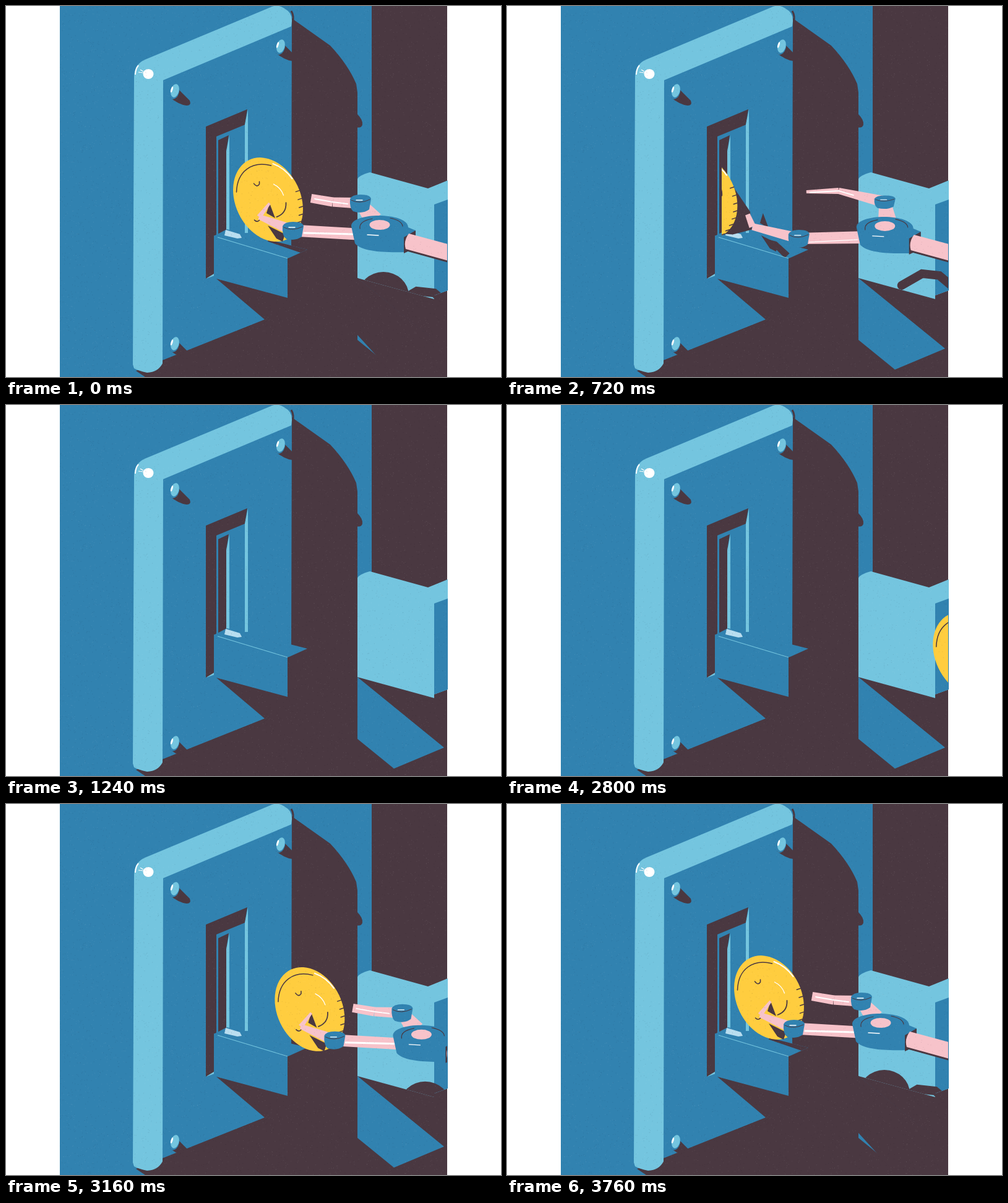
Recreate the animation shown at these times as an HTML page with a canvas. Size 800 by 600 pixels, loop 3.8 s.

```html
<!DOCTYPE html>
<html>
<head>
<meta charset="utf-8">
<title>Coin slot</title>
<style>
html, body { margin: 0; width: 100%; height: 100%; overflow: hidden; background: #fff; }
canvas { display: block; }
</style>
</head>
<body>
<canvas id="stage" width="800" height="600"></canvas>
<script>
const LOOP = 3800;
const BLUE = '#3182b0', LIGHT = '#74c5df', DARK = '#4a3841', GOLD = '#ffcd3f', PINK = '#f7c3ca', WHITE = '#fff';
const stage = document.getElementById('stage').getContext('2d');
let c = stage;

const fill = (color, d) => { c.fillStyle = color; c.fill(new Path2D(d)); };
const line = (color, width, d) => {
  c.strokeStyle = color;
  c.lineWidth = width;
  c.stroke(new Path2D(d));
};
const oval = (color, x, y, rx, ry, turn = 0) => {
  c.fillStyle = color;
  c.beginPath();
  c.ellipse(x, y, rx, ry, turn, 0, 7);
  c.fill();
};
const group = (x, y, draw) => { c.save(); c.translate(x, y); draw(); c.restore(); };
const clipped = (d, draw) => { c.save(); c.clip(new Path2D(d)); draw(); c.restore(); };
const lerp = (a, b, k) => a + (b - a) * k;
const smooth = k => { k = Math.min(1, Math.max(0, k)); return k * k * (3 - 2 * k); };
// Between two poses of [x, y, width] points
const blend = (a, b, k) => a.map((p, i) => p.map((v, j) => lerp(v, b[i][j], k)));

// Tapered limb between two [x, y, width] points
function bone(color, [x, y, w], [u, v, z]) {
  const d = 2 * Math.hypot(u - x, v - y), nx = (y - v) / d, ny = (u - x) / d;
  fill(color, `M${x + nx * w} ${y + ny * w}L${u + nx * z} ${v + ny * z}L${u - nx * z} ${v - ny * z}L${x - nx * w} ${y - ny * w}Z`);
}

// Smooth curve through [time, value] keys
function curve(keys, t) {
  const n = keys.length - 1;
  if (t <= keys[0][0]) return keys[0][1];
  if (t >= keys[n][0]) return keys[n][1];
  let i = 0;
  while (t >= keys[i + 1][0]) i++;
  const slope = j => {
    const p = keys[Math.max(0, j - 1)], q = keys[Math.min(n, j + 1)];
    return (q[1] - p[1]) / (q[0] - p[0]);
  };
  const [t0, v0] = keys[i], [t1, v1] = keys[i + 1];
  const h = t1 - t0, u = (t - t0) / h, w = 1 - u;
  return v0 * (1 + 2 * u) * w * w + v1 * u * u * (3 - 2 * u)
    + h * u * w * (slope(i) * w - slope(i + 1) * u);
}

const BLOCK = 'M568 280Q570 274 588 269L682 295L714 282V460L692 468V474L568 440Z';
const FLOOR = 'M566 438L714 558V600H566Z';
const TRAY_TOP = 'M338 371L357 361L487 394L456 408Z';
const COIN_ROOM = 'M347 0H800V600H455V408L347 373Z';
const SHADE_ROOM = 'M347 0H461V387L487 394L455 408L347 373Z';

function bolt() {
  fill(DARK, 'M8 -2L25 15Q28 23 20 23Q8 22 -7 10Z');
  oval(BLUE, 0, 0, 8, 13, .25);
  oval(LIGHT, 1, -1, 6.5, 11, .25);
  oval(WHITE, -4, -3, 1.5, 5, .3);
}

function scene() {
  c.fillStyle = BLUE;
  c.fillRect(87, 0, 626, 600);
  fill(DARK, 'M462 20L524 64Q553 95 566 126L568 140V285H591V0H713V600H225L210 590L418 507L340 441L461 400Z');
  fill(DARK, 'M567 174Q577 184 576 192Q574 198 567 196Z');
  line(DARK, 3, 'M461 8Q466 16 463 28');
  fill(LIGHT, 'M205 580L207 114Q208 94 224 87L430 1Q440 -3 450 4Q463 11 462 25L461 33L254 120L253 578Q246 592 228 593Q214 590 207 586Z');
  line(WHITE, 2, 'M209 111Q209 102 214 96');
  line(WHITE, 1.2, 'M214 107L222 108M217 103L222 106');
  oval(WHITE, 230, 110, 8.5, 8);
  for (const [x, y] of [[272, 138], [443, 66], [272, 547]]) group(x, y, bolt);

  fill(DARK, 'M323 195L390 167L386 192L340 211V370L336 372V434L323 441Z');
  fill(LIGHT, 'M391 167V367H386V192Z');
  fill(DARK, 'M343 217L360 209L356 235V365L343 370Z');
  fill(LIGHT, 'M361 209V364H356V235Z');
  fill(LIGHT, 'M323 441L336 433L340 435Z');
  fill(BLUE, TRAY_TOP);
  fill('#b9def0', 'M355 362L378 369L381 375L374 376L353 371Z');
  fill(BLUE, 'M336 371L455 408V472L336 440Z');
  line(LIGHT, 1.2, 'M342 374L455 408');

  fill(LIGHT, BLOCK);
  fill(BLUE, 'M692 321L714 313V460L692 468Z');
  fill(BLUE, 'M568 440L708 554L627 588L568 540Z');
}

function grain() {
  let seed = 7;
  const rnd = () => (seed = seed * 16807 % 2147483647) / 2147483647;
  for (let i = 0; i < 9000; i++) {
    c.fillStyle = i % 2 ? 'rgba(255,255,255,.09)' : 'rgba(30,20,40,.1)';
    c.fillRect(87 + rnd() * 625, rnd() * 600, 1, 1);
  }
}

function layer(draw) {
  const canvas = document.createElement('canvas');
  canvas.width = 800;
  canvas.height = 600;
  c = canvas.getContext('2d');
  draw();
  c = stage;
  return canvas;
}
const backdrop = layer(scene), specks = layer(grain);

function coin(turn) {
  const tilt = 1.126, cs = Math.cos(tilt), sn = Math.sin(tilt);
  oval(GOLD, 0, 0, 71, 52.6, tilt);
  line(DARK, 1.5, 'M-51 -12C-50 -46 -26 -63 5 -55');
  line(WHITE, 2, 'M8 -58Q27 -51 39 -34');
  // Ridges on the right rim
  for (let a = -1.45; a < 0; a += .19) {
    const u = 71 * Math.cos(a), v = 52.6 * Math.sin(a);
    line(DARK, 1.5, `M${u * cs - v * sn} ${u * sn + v * cs}l-6 2`);
  }
  c.rotate(turn);
  line(DARK, 1.6, 'M-23 -26Q-18 -19 -14 -25V-29M-22 33Q-17 38 -13 32');
  line(DARK, 1.8, 'M29 5Q30 22 14 28');
  line(WHITE, 1.3, 'M9 -25Q21 -19 25 -7');
}

function joint([x, y], h) {
  group(x, y, () => {
    c.scale(1, h);
    fill(BLUE, 'M-17 -7Q-14 -14 0 -14Q16 -14 17 -7L14 10Q3 18 -12 13Q-18 8 -17 -7Z');
    line(DARK, 1, 'M-15 -5Q-2 2 15 -6');
    line(WHITE, 1.3, 'M-7 -5L3 -5');
  });
}

// Finger points from tip to palm: gripping, then let go
const FAR = [
  [[493, 311, 14], [528, 317, 15], [573, 319, 18], [594, 346, 30]],
  [[477, 298.5, 5], [529, 297, 10], [604, 315, 19], [608, 346, 30]]];
const NEAR = [
  [[426, 319, 4], [409, 341, 8], [464, 363, 19], [568, 369, 19]],
  [[382, 335, 8], [390, 355, 11], [465, 374, 18], [574, 372, 20]]];
const TRAY_SHADE = [
  [[425, 374, 14], [495, 394, 22]],
  [[418, 375, 9], [446, 402, 11]]];

function finger([tip, bend, knuckle, palm], h) {
  bone(PINK, tip, bend);
  bone(PINK, bend, knuckle);
  bone(PINK, knuckle, palm);
  joint(knuckle, h);
}

function hand(k) {
  const far = blend(...FAR, k), near = blend(...NEAR, k);
  finger(far, lerp(1, .75, k));
  line(WHITE, 2, `M${far[0][0] + 6} ${far[0][1] + 1}L${far[1][0]} ${far[1][1]}l24 ${lerp(3, 7, k)}`);

  // Gap between the near finger and the coin
  const [x, y] = near[1];
  fill(DARK, `M${x + 17} ${y - 22}l9 24l-14 -8ZM${x + 14} ${y + 14}l28 14l-4 12l-10 -5Z`);
  finger(near, 1);
  line(WHITE, lerp(3, 1.3, k), `M482 ${lerp(367, 380, k)}L560 ${lerp(369, 376, k)}`);

  // Palm and arm
  fill(BLUE, 'M558 356C558 333 650 333 650 358L662 363V390L645 398C610 399 575 397 564 384Z');
  fill(DARK, 'M643 374L662 363V391L643 400Z');
  fill(DARK, 'M647 392L900 462V466L646 396Z');
  fill(PINK, 'M651 368Q642 380 646 393L900 463V435Z');
  line(DARK, 1.2, 'M572 360Q570 348 592 344M621 343Q640 347 641 356');
  line(WHITE, 1.4, 'M584 370L602 371M600 358Q608 360 615 355');
  oval(PINK, 604, 354, 16.5, 8);
}

// How far the hand is pulled back along its line of travel
function pull(t) {
  if (t < 640) return 0;
  if (t < 2000) return 1.65 * ((t - 640) / 40) ** 2;
  return curve([[2720, 394], [2800, 322], [3160, 68], [3320, 4], [3440, -6], [3760, 0]], t);
}

function shadows(k, slide) {
  clipped(FLOOR, () => group(-.63 * slide, .78 * slide, () =>
    fill(DARK, 'M548 422L740 578V720L597 564L568 532L520 480Z')));
}

function draw(t) {
  const release = t < 2000;
  const off = pull(t), dy = off * .28;
  const k = release ? smooth((t - 10) / 380) : 0;
  let x = 423.5 + off, y = 313 + dy, turn = 0;
  if (release) {
    // The coin drops onto the tray, then rolls faster and faster into the slot
    const n = t / 40;
    x -= .352 * n * n;
    y = 313 + 3.7 * n - .222 * n * n;
    turn = -.0035 * n * n;
  }

  c.clearRect(0, 0, 800, 600);
  c.drawImage(backdrop, 0, 0);
  c.save();
  c.beginPath();
  c.rect(87, 0, 626, 600);
  c.clip();

  const slide = release ? 130 * (t / 720) ** 5 : 0;
  clipped(FLOOR, () => group(-.63 * slide + (release ? 0 : off * 3), .78 * slide, () =>
    fill(DARK, 'M548 422L740 578V720L568 532L520 480Z')));
  clipped(BLOCK, () => group(off, dy, () => {
    oval(DARK, 610, lerp(468, 530, k), 41, 38);
    const drop = 30 * (1 - k);
    line(DARK, 14, `M631 ${450 + drop}L664 ${431 + drop}L692 ${434 + drop}L718 ${456 + drop}`);
  }));
  clipped(TRAY_TOP, () => group(off, dy, () => bone(DARK, ...blend(...TRAY_SHADE, k))));

  if (t < 860 || !release) {
    if (release) clipped(SHADE_ROOM, () => group(x, y, () => fill(DARK, 'M20 -50L43 -25L77 25L80 54L49 62L20 60Z')));
    clipped(COIN_ROOM, () => group(x, y, () => coin(turn)));
  }
  if (off < 400) group(off, dy, () => hand(k));
  c.restore();
  c.drawImage(specks, 0, 0);
}

stage.lineCap = 'round';
const start = performance.now();
function tick() {
  draw((performance.now() - start) % LOOP);
  requestAnimationFrame(tick);
}
tick();
</script>
</body>
</html>
```
